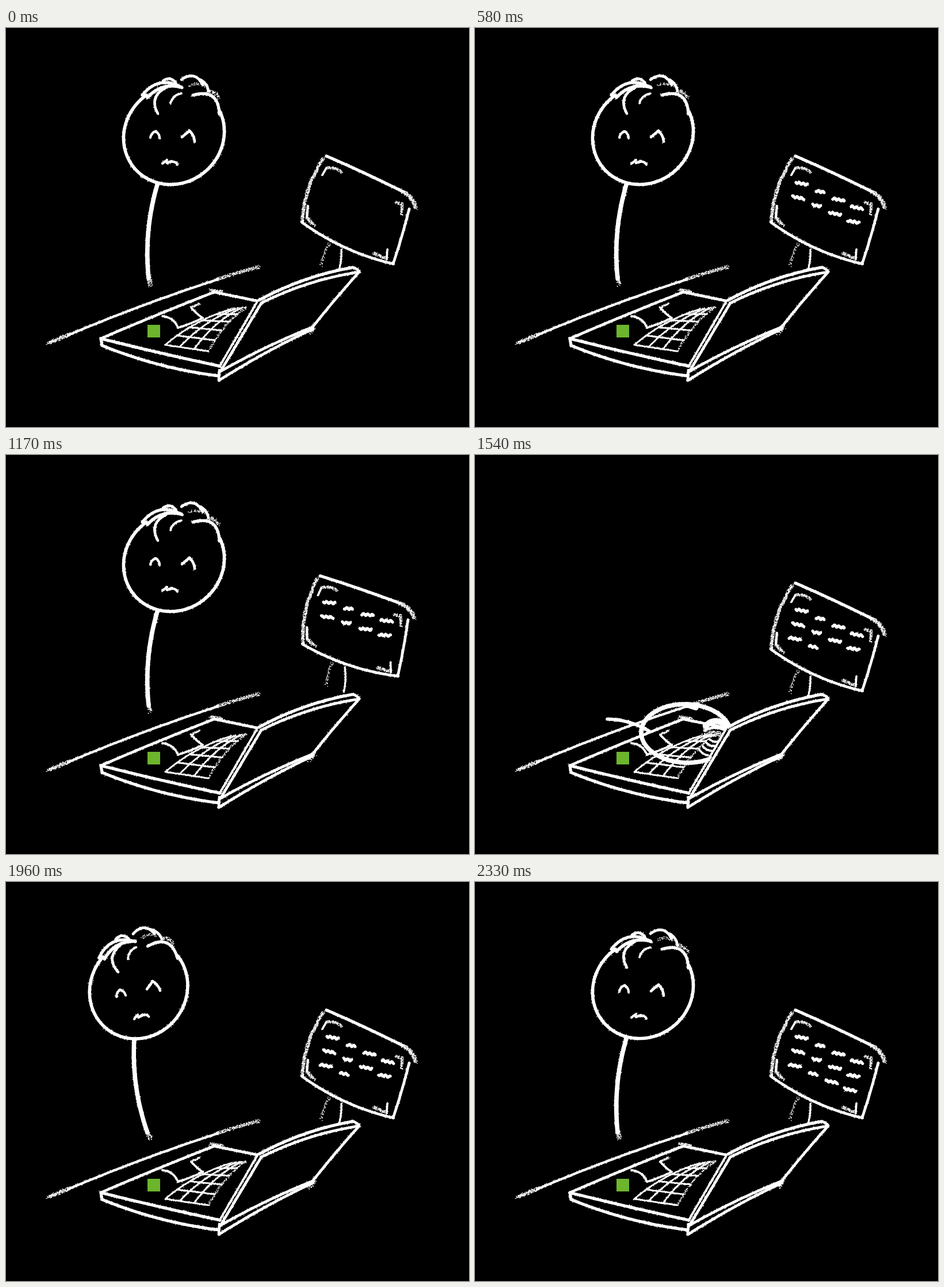
An HTML page with a canvas for the animation above (2.37 s loop, 805 by 695 pixels).

```html
<!DOCTYPE html>
<html lang="en">
<head>
<meta charset="utf-8">
<title>Head on keyboard</title>
<style>
  html, body { margin: 0; width: 100%; height: 100%; overflow: hidden; background: #000; }
  canvas { display: block; }
</style>
</head>
<body>
<canvas id="stage" width="805" height="695"></canvas>
<script>
const ctx = document.getElementById('stage').getContext('2d');
const LOOP = 2370;
const DEG = Math.PI / 180;
const SIGN_HOP = 40;

// Sign tilt after each bang, and words on the sign from then on
const TILTS = [0, -6, 8.7, 0];
const WORD_COUNTS = [8, 8, 10, 12];

const round10 = v => Math.round(v / 10) * 10;
const mix = (a, b, u) => a + (b - a) * u;

const BANGS = TILTS.map((tilt, k) => {
  const up = round10(582 + 583 * k);
  return { lean: up - 500, hit: round10(370 + 586 * k), rise: up - 80, up, tilt, words: WORD_COUNTS[k] };
});

let seed = 1;
function random() {
  seed = (seed * 16807) % 2147483647;
  return seed / 2147483647;
}

function specks(pts, spread, count) {
  for (const [x, y] of pts) {
    for (let i = 0; i < count; i++) {
      ctx.fillRect(x + (random() - 0.5) * spread - 0.7, y + (random() - 0.5) * spread - 0.7, 1.4, 1.4);
    }
  }
}

// A chalk stroke; with grains given it is dry and leaves only specks
function chalk(pts, width, grains = 0) {
  if (!grains) {
    ctx.lineWidth = width - 0.4;
    ctx.beginPath();
    pts.forEach(p => ctx.lineTo(...p));
    ctx.stroke();
  }
  specks(pts, width + 0.5, grains || 1);
}

// Curve from one point to another, bulging to the left of its direction
function arc(x1, y1, x2, y2, bow = 0, width = 5, grains = 0) {
  const len = Math.hypot(x2 - x1, y2 - y1);
  const n = Math.ceil(len + Math.abs(bow));
  const pts = Array.from({ length: n + 1 }, (_, i) => {
    const u = i / n;
    const lift = 4 * bow * u * (1 - u) / len;
    return [mix(x1, x2, u) + (y2 - y1) * lift, mix(y1, y2, u) - (x2 - x1) * lift];
  });
  chalk(pts, width, grains);
}

function ring(cx, cy, rx, ry, tilt, from, to, width) {
  const c = Math.cos(tilt * DEG), s = Math.sin(tilt * DEG);
  const pts = Array.from({ length: 301 }, (_, i) => {
    const a = mix(from, to, i / 300) * DEG;
    const x = rx * Math.cos(a), y = ry * Math.sin(a);
    return [cx + x * c - y * s, cy + x * s + y * c];
  });
  chalk(pts, width);
}

function place(x, y, angle, ox, oy, sx, sy, draw) {
  ctx.save();
  ctx.translate(x, y);
  ctx.rotate(angle * DEG);
  ctx.scale(sx, sy);
  ctx.translate(-ox, -oy);
  draw();
  ctx.restore();
}

function hair() {
  arc(237, 117, 306, 104, 15, 5.5);
  arc(246, 121, 305, 103, 9, 6);
  arc(264, 149, 278, 104, 12);
  arc(286, 131, 305, 114, 4, 4);
  arc(273, 92, 296, 97, 6);
  arc(305, 90, 342, 99, 11);
  arc(338, 90, 352, 110, 3);
  arc(318, 101, 344, 102, 4, 4, 1);
  arc(325, 117, 371, 150, 18, 5.5);
  arc(350, 110, 370, 122, 4, 5, 2);
}

function head() {
  ring(292, 186, 90, 84, -40, 275, 14, 6);
  hair();
  arc(251, 191, 260, 180, 2, 4.5);
  arc(260, 180, 267, 192, 2, 4.5);
  arc(306, 190, 319, 179, 0, 5);
  arc(319, 179, 328, 198, 2, 5);
  arc(272, 236, 280, 230, 0, 4.5);
  arc(280, 235, 288, 232, 0, 5);
  arc(288, 233, 298, 238, 2, 4.5);
}

function upright() {
  head();
  arc(263, 273, 248, 436, -8, 8);
  arc(248, 434, 251, 447, 0, 7, 4);
}

function leanBack(angle) {
  place(250, 445, angle, 250, 445, 0.99, 0.99, upright);
}

function halfway(angle, x, y) {
  place(x, y, angle, 292, 185, 0.94, 0.83, head);
  arc(241, 452, x - 48, y + 55, 8, 7);
}

function faceDown() {
  arc(230, 460, 303, 481, 5, 6);
  ring(367, 485, 78, 51, 2, -18, -305, 8);
  arc(368, 435, 384, 440, 0, 10);
  arc(401, 472, 436, 471, 8, 11);
  arc(399, 480, 432, 478, 4);
  arc(398, 489, 428, 488, 3, 9, 5);
  for (let i = 0; i < 4; i++) arc(390 + 6 * i, 513 - 6 * i, 405 + 6 * i, 523 - 8 * i, -2, 4);
}

function table() {
  arc(73, 549, 112, 533, 0, 5, 4);
  arc(108, 535, 368, 438, 3, 4.5);
  arc(364, 439, 440, 416, 1, 5, 3);
}

// Point on the key grid: u across, v away from the front
function keyAt(u, v) {
  const bulge = 24 * v * (1 - v);
  return [
    mix(mix(277, 352, u), mix(390, 417, u), v) - bulge * 0.5,
    mix(mix(552, 563, u), mix(490, 487, u), v) - bulge
  ];
}

function keys() {
  for (let i = 0; i <= 3; i++) {
    const pts = Array.from({ length: 121 }, (_, k) => keyAt(i / 3, k / 120));
    chalk(pts, 3, i === 3 ? 1 : 0);
  }
  for (let j = 0; j <= 5; j++) {
    arc(...keyAt(0, j / 5), ...keyAt(1, j / 5), 0, 3, j === 5 ? 2 : 0);
  }
}

function base() {
  arc(165, 541, 362, 460, 1);
  arc(362, 460, 440, 476, 0);
  arc(355, 456, 376, 459, 0, 4, 3);
  arc(165, 541, 372, 589, -1, 5.5);
  arc(165, 541, 167, 553, 0, 5.5);
  arc(167, 553, 370, 606, -7, 5.5);

  arc(272, 502, 299, 522, 5, 4);
  arc(299, 522, 342, 505, -1, 4);
  arc(342, 505, 322, 487, 1, 4);
  arc(322, 487, 337, 480, 0, 3, 3);
  keys();

  ctx.fillStyle = '#6cb52d';
  ctx.fillRect(246, 517, 22, 22);
  ctx.fillStyle = '#fff';
}

function lid() {
  ctx.fillStyle = '#000';
  ctx.beginPath();
  ctx.moveTo(440, 474);
  ctx.quadraticCurveTo(521, 431, 603, 416);
  ctx.lineTo(614, 424);
  ctx.lineTo(533, 521);
  ctx.lineTo(373, 598);
  ctx.fill();
  ctx.fillStyle = '#fff';

  arc(440, 474, 603, 417, 7, 5.5);
  arc(603, 417, 614, 424, 1);
  arc(444, 479, 614, 425, 7);
  arc(436, 478, 371, 590, 0, 4);
  arc(444, 479, 373, 598, 0, 5);
  arc(614, 425, 533, 521, -1);
  arc(533, 521, 373, 598, -3);
  arc(370, 614, 534, 524, 3);
  arc(371, 596, 370, 613);
  arc(527, 532, 537, 521, 0, 6, 2);
}

function word(i) {
  const row = Math.floor(i / 4), col = i % 4;
  const x = 568 - 6 * row + 32 * col;
  const y = 271 + 24.5 * row + 14 * col;
  const w = col === 1 ? 14 : 20;
  const pts = Array.from({ length: w + 1 }, (_, k) => {
    const dx = k - w / 2;
    return [x + dx, y + dx * 0.2 + 1.6 * Math.sin(k * 0.85 + i)];
  });
  chalk(pts, 5.4);
}

function sign(count) {
  arc(557, 223, 690, 285, 1, 5.5);
  arc(690, 285, 712, 313, 4, 6, 5);
  arc(552, 227, 515, 338, -8, 5, 4);
  arc(514, 338, 674, 411, -9);
  arc(701, 315, 673, 411, 1);

  arc(550, 256, 557, 244, 0, 4);
  arc(557, 244, 584, 251, 3, 4, 3);
  arc(677, 303, 689, 307, 0, 4, 3);
  arc(689, 307, 688, 325, 0, 4, 3);
  arc(525, 310, 523, 330, 0, 4.5);
  arc(523, 330, 536, 344, 0, 4.5, 4);
  arc(663, 386, 662, 402, 0, 4);
  arc(662, 402, 639, 392, 0, 4, 3);

  arc(563, 374, 548, 414, -2, 4, 1);
  arc(583, 386, 577, 428, 2, 3.5);
  for (let i = 0; i < count; i++) word(i);
}

function figure(t, bang) {
  if (!bang) return upright();
  const { lean, hit, rise } = bang;
  if (t < lean + 80) leanBack(-7);
  else if (t < hit - 90) leanBack(-13.5);
  else if (t < hit) halfway(32, 350, 290);
  else if (t < rise) faceDown();
  else halfway(24, 336, 275);
}

function render(t) {
  seed = 7;
  ctx.fillStyle = '#000';
  ctx.fillRect(0, 0, 805, 695);
  ctx.fillStyle = ctx.strokeStyle = '#fff';
  ctx.lineCap = ctx.lineJoin = 'round';

  const bang = BANGS.find(b => t >= b.lean && t < b.up);
  const hop = BANGS.find(b => t >= b.rise && t < b.up + (b.tilt ? SIGN_HOP : 0));
  const count = BANGS.reduce((n, b) => t >= b.hit ? b.words : n, 0);
  const bounce = bang && t >= bang.rise;
  const laptop = draw => place(370, bounce ? 609 : 615, bounce ? 2 : 0, 370, 615, 1, 1, draw);

  table();
  place(hop ? 613 : 614, hop ? 302 : 321, hop ? hop.tilt : 0, 614, 321, 1, 1, () => sign(count));
  laptop(base);
  figure(t, bang);
  laptop(lid);
}

const start = performance.now();
function tick() {
  render((performance.now() - start) % LOOP);
  requestAnimationFrame(tick);
}
tick();
</script>
</body>
</html>
```
